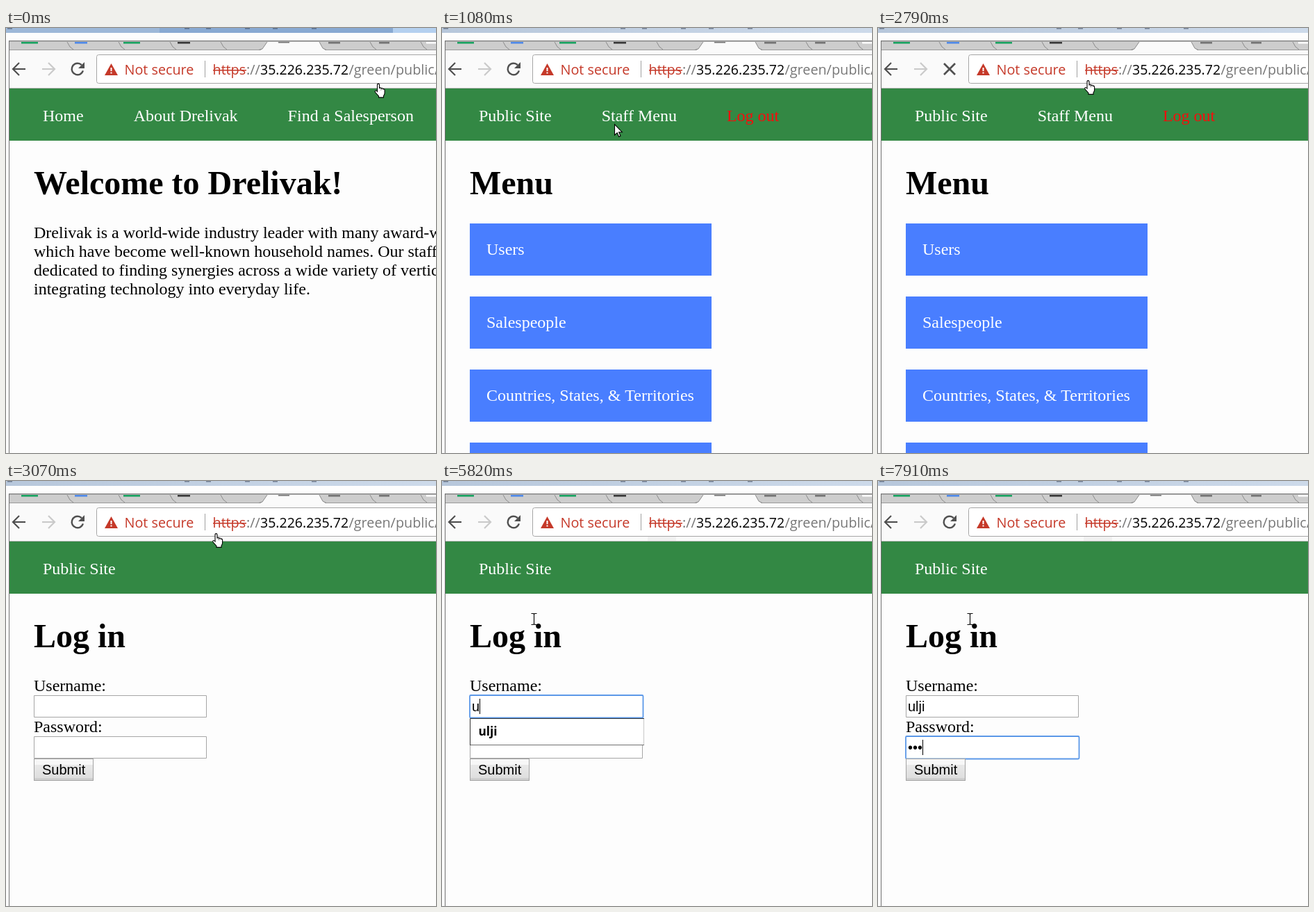
These frames come from a looping animation (619x611 px, 8 s). An HTML page with a canvas:

```html
<!DOCTYPE html>
<html lang="en">
<head>
<meta charset="utf-8">
<title>Browser login</title>
<style>
html, body { margin: 0; width: 100%; height: 100%; overflow: hidden; background: #fdfdfd; }
canvas { display: block; }
</style>
</head>
<body>
<canvas id="stage" width="619" height="611"></canvas>
<script>
const ctx = document.getElementById('stage').getContext('2d');
const LOOP = 8000;
const SERIF = '"Liberation Serif", "Times New Roman", serif';
const SANS = '"Liberation Sans", Arial, sans-serif';
const UI = '"Open Sans", "Noto Sans", sans-serif';
const PAGE = '#fdfdfd', GREEN = '#338844', RED = '#c53929';
const BRAND = 'Drelivak', USER = 'ulji';

// Each track is a list of [start time, ...values].
const cursors = [
  [0, 'hand', 530.5, 79.5], [840, 'arrow', 360, 116], [960, 'arrow', 250, 138],
  [1080, 'arrow', 248, 138], [1390, 'arrow', 240, 140], [1540, 'arrow', 238, 154],
  [1660, 'arrow', 237, 163], [1940, 'arrow', 290, 128], [2060, 'arrow', 348, 93],
  [2210, 'arrow', 318, 78], [2360, 'hand', 298, 76], [2510, 'hand', 297, 75],
  [3500, 'arrow', 325, 143], [3650, 'beam', 200, 218], [3780, 'beam', 131, 198],
  [3930, 'beam', 128, 191], [4080, 'beam', 128, 190]
];
const pages = [[0, home], [1080, menu], [3070, login]];
const loading = [[0, false], [840, true], [1080, false], [2790, true], [3070, false]];
const focus = [[0, ''], [4340, 'user'], [6390, 'pass']];
const typed = [[0, 0], [5700, 1], [5940, 2], [6090, 3], [6240, 4]];
const dots = [[0, 0], [7790, 2], [7910, 3]];
const caret = [[0, true], [4860, false], [5420, true], [6890, false], [7350, true]];

const shapes = {
  arrow: new Path2D('M.5 .5V16L4.2 12.6 6.6 18.3 9 17.3 6.6 11.7H11.3Z'),
  hand: new Path2D('M4 11.8V2.2Q4 .6 5.5 .6T7 2.2V7.5Q7 6.4 8.4 6.4T9.8 7.6Q10 7 11 7T12.3 8.4' +
    'Q12.6 8 13.4 8.1 14.6 8.4 14.6 9.8V14Q14.6 16 13 18V20.4H6V18.4L1 12.8Q.3 11.3 1.3 10.6 2.3 10 4 11.8Z'),
  beam: new Path2D('M.5 .5H3.5L4.5 1.5 5.5 .5H8.5M4.5 1.5V15.5M.5 16.5H3.5L4.5 15.5 5.5 16.5H8.5')
};

function at(track, t) {
  let now = track[0];
  for (const step of track) if (step[0] <= t) now = step;
  return now[1];
}

function box(x, y, w, h, color) {
  ctx.fillStyle = color;
  ctx.fillRect(x, y, w, h);
}

function text(str, x, y, font, color = '#000') {
  ctx.font = font;
  ctx.fillStyle = color;
  ctx.fillText(str, x, y);
}

function line(points, color, width = 1) {
  ctx.beginPath();
  for (let i = 0; i < points.length; i += 2) ctx.lineTo(points[i], points[i + 1]);
  ctx.strokeStyle = color;
  ctx.lineWidth = width;
  ctx.stroke();
}

function titleStrip(t) {
  if (t < 500) {
    box(0, 0, 221, 7, '#9db8d8');
    box(221, 0, 336, 7, '#88a9d2');
    box(557, 0, 62, 7, '#b4d0ef');
  } else {
    const g = ctx.createLinearGradient(0, 0, 619, 0);
    g.addColorStop(0, '#b7c7db');
    g.addColorStop(1, '#cddaea');
    box(0, 0, 619, 7, g);
  }
  for (const x of [2, 257, 288, 344, 384, 440]) box(x, 0, 7, 1.5, 'rgba(50,60,80,.55)');
}

function tabs(busy) {
  box(5, 20, 614, 12, '#cdcdcd');
  for (const x of [88, 162, 236, 309, 524, 597]) line([x, 20, x + 4, 27, x + 9, 31], '#8b8b8b');
  const icons = [[22, 24, '#12a05c'], [99, 18, '#4a86e8'], [169, 24, '#12a05c'], [247, 18, '#333'],
    [464, 17, '#707070'], [537, 15, '#707070'], [605, 14, '#fff']];
  for (const [x, w, color] of icons) box(x, 20, w, 2.5, color);
  line([5, 31.5, 619, 31.5], '#9a9a9a');
  ctx.beginPath();
  for (const [x, y] of [[365, 33], [369, 30], [376, 20], [451, 20], [456, 29], [461, 33]]) ctx.lineTo(x, y);
  ctx.fillStyle = '#fafafa';
  ctx.fill();
  line([364, 31.5, 369, 30, 376, 20], '#8b8b8b');
  line([451, 20, 456, 29, 461, 31.5], '#8b8b8b');
  if (!busy) box(392, 20, 16, 1.5, '#707070');
}

function navArrow(x, dir, color) {
  line([x, 59, x + 18 * dir, 59], color, 2.2);
  line([x + 9 * dir, 50, x, 59, x + 9 * dir, 68], color, 2.2);
}

function reload(busy) {
  if (busy) {
    line([95, 51, 111, 67], '#505050', 2.6);
    line([111, 51, 95, 67], '#505050', 2.6);
    return;
  }
  ctx.beginPath();
  ctx.arc(103, 59, 8.3, 0.3, 5.5);
  ctx.strokeStyle = '#505050';
  ctx.lineWidth = 2.4;
  ctx.stroke();
  ctx.fillStyle = '#505050';
  ctx.fill(new Path2D('M113 49V58H104Z'));
}

function toolbar(t, busy) {
  box(5, 32, 614, 54, '#fafafa');
  if (t >= 3500) box(296, 80, 41, 6, '#f1f1f1');
  box(5, 86, 614, 1, '#b8b8b8');
  navArrow(10, 1, '#505050');
  navArrow(70, -1, '#cacaca');
  reload(busy);
  ctx.beginPath();
  ctx.roundRect(130.5, 38.5, 520, 41, 3);
  ctx.fillStyle = '#fff';
  ctx.fill();
  ctx.strokeStyle = '#a6a6a6';
  ctx.lineWidth = 1;
  ctx.stroke();
  ctx.fillStyle = RED;
  ctx.fill(new Path2D('M151.5 51L161 68H142Z'));
  box(150.5, 57, 2, 5, '#fff');
  box(150.5, 63.5, 2, 2, '#fff');
  const font = '19.8px ' + UI;
  text('Not secure', 170.5, 67, font, RED);
  box(286, 47, 1, 24, '#a0a0a0');
  text('https', 297.5, 67, font, RED);
  box(298, 60, 48, 1.5, RED);
  text('://', 346, 67, font, '#777');
  text('35.226.235.72', 366, 67, '19.5px ' + UI);
  text('/green/public/', 493.5, 67, font, '#777');
}

function nav(items) {
  box(5, 87, 614, 75, GREEN);
  let x = 53;
  for (const label of items) {
    text(label, x, 134, '24px ' + SERIF, label === 'Log out' ? '#f80c0c' : '#fff');
    x += ctx.measureText(label).width + 72;
  }
}

function heading(str) {
  text(str, 40, 239, 'bold 48px ' + SERIF);
}

function home() {
  nav(['Home', 'About ' + BRAND, 'Find a Salesperson']);
  heading('Welcome to ' + BRAND + '!');
  [BRAND + ' is a world-wide industry leader with many award-winning',
    'which have become well-known household names. Our staff is',
    'dedicated to finding synergies across a wide variety of verticals,',
    'integrating technology into everyday life.'
  ].forEach((row, i) => text(row, 40, 302 + 27 * i, '24px ' + SERIF));
}

function menu() {
  nav(['Public Site', 'Staff Menu', 'Log out']);
  heading('Menu');
  ['Users', 'Salespeople', 'Countries, States, & Territories', ''].forEach((label, i) => {
    box(40, 281 + 105 * i, 348, 75, '#497eff');
    text(label, 64, 326 + 105 * i, '24px ' + SERIF, '#fff');
  });
}

function field(y, value, active, blink) {
  box(40, y, 249, 32, '#fff');
  ctx.beginPath();
  if (active) ctx.roundRect(40, y, 249.5, 32.5, 1.5);
  else ctx.rect(40.5, y + 0.5, 248, 31);
  ctx.strokeStyle = active ? '#5b98e8' : '#a6a6a6';
  ctx.lineWidth = active ? 1.8 : 1;
  ctx.stroke();
  text(value, 43, y + 23, '20px ' + SANS);
  if (active && blink) box(Math.floor(43 + ctx.measureText(value).width), y + 5, 1, 22, '#000');
}

function login(t) {
  nav(['Public Site']);
  heading('Log in');
  const active = at(focus, t), blink = at(caret, t);
  text('Username:', 40, 302, '24px ' + SERIF);
  text('Password:', 40, 361, '24px ' + SERIF);
  field(308, USER.slice(0, at(typed, t)), active === 'user', blink);
  field(367, '•'.repeat(at(dots, t)), active === 'pass', blink);

  const g = ctx.createLinearGradient(0, 408, 0, 430);
  g.addColorStop(0, '#e9e9e9');
  g.addColorStop(1, '#dcdcdc');
  box(40, 400, 86, 31, '#f7f7f7');
  box(40, 408, 86, 23, g);
  box(41, 427, 84, 3, '#cfcfcf');
  ctx.strokeStyle = '#a3a3a3';
  ctx.lineWidth = 1;
  ctx.strokeRect(40.5, 399.5, 85, 31);
  text('Submit', 52, 422, '20px ' + SANS);

  if (t >= 5820 && t < 6390) {
    box(40, 341, 251, 39, '#fff');
    line([290.5, 341, 290.5, 380], '#c8c8c8');
    line([40, 379.5, 291, 379.5], '#707070');
    line([40.5, 380, 40.5, 341.5, 291, 341.5], '#333');
    text(USER, 52.5, 366, 'bold 17.2px ' + UI);
  }
}

function cursor(t) {
  const [, kind, x, y] = cursors.findLast(c => c[0] <= t);
  ctx.save();
  ctx.translate(x, y);
  ctx.lineWidth = 1.1;
  ctx.strokeStyle = '#000';
  ctx.fillStyle = '#fff';
  if (kind !== 'beam') ctx.fill(shapes[kind]);
  ctx.stroke(shapes[kind]);
  ctx.restore();
}

function draw(t) {
  const busy = at(loading, t);
  box(0, 0, 619, 611, PAGE);
  titleStrip(t);
  tabs(busy);
  toolbar(t, busy);
  at(pages, t)(t);
  box(4, 18, 615, 1.5, '#777');
  box(4, 18, 1, 593, '#707070');
  cursor(t);
}

const start = performance.now();
function tick() {
  draw((performance.now() - start) % LOOP);
  requestAnimationFrame(tick);
}
tick();
</script>
</body>
</html>
```
